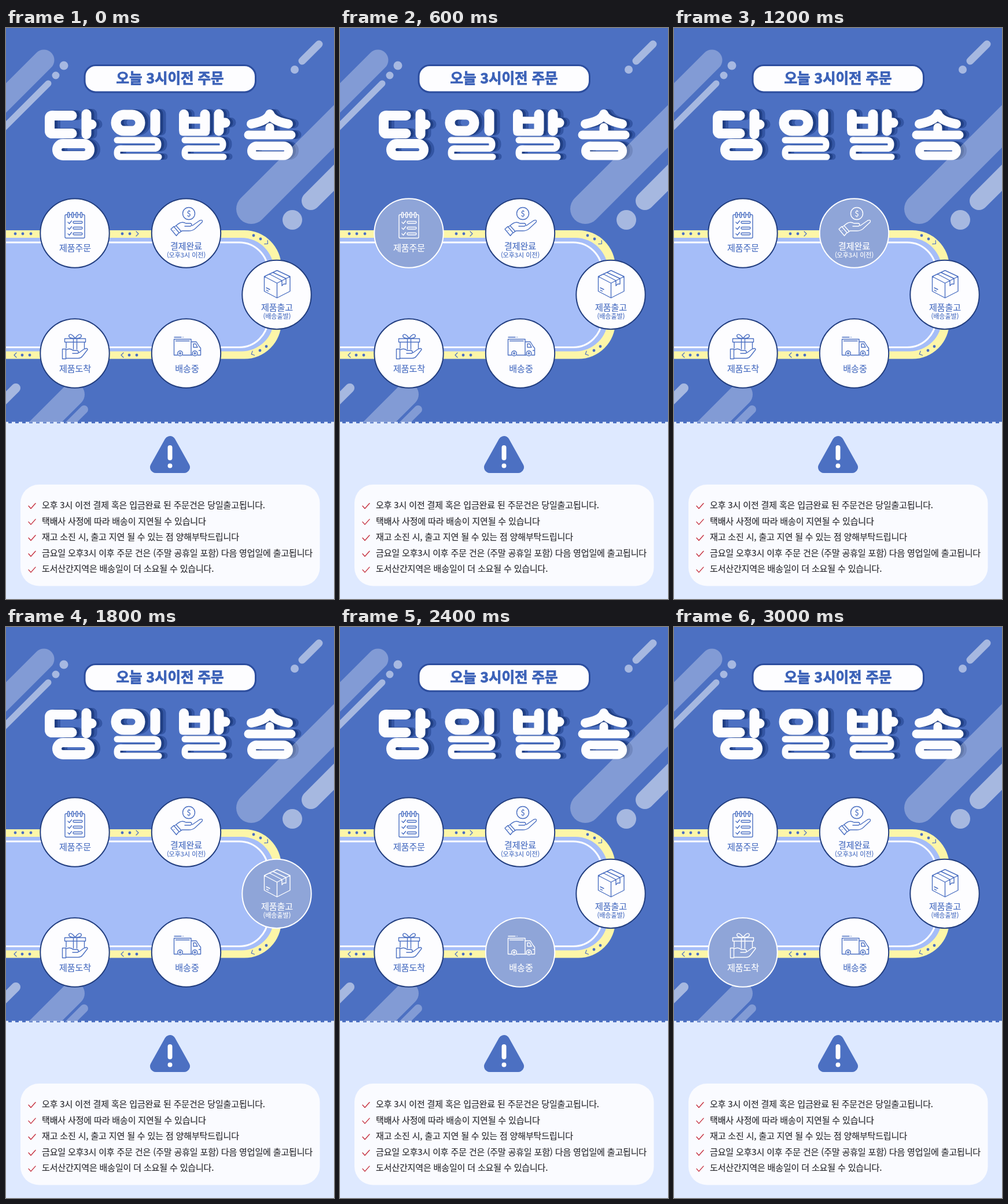
An HTML page that plays this animation: 567 by 988 pixels, repeating every 3.6 s.

```html
<!DOCTYPE html>
<html lang="ko">
<head>
<meta charset="utf-8">
<style>
html, body { margin: 0; width: 100%; height: 100%; overflow: hidden; background: #dee9ff; }
svg { display: block; width: 567px; height: 988px; font-family: "Noto Sans CJK KR", "Noto Sans KR", sans-serif; }
.line { fill: none; stroke-linecap: round; stroke-linejoin: round; }
.soft { stroke: #fff; stroke-opacity: .3; }
.bright { stroke: #fff; stroke-opacity: .5; }
.step { --ink: #4c70c2; --face: #fdfdff; --rim: #233f80; }
.step.on { --ink: #fff; --face: #8fa5d8; --rim: #fff; }
.step > circle { fill: var(--face); stroke: var(--rim); stroke-width: 2; }
.step text { fill: var(--ink); stroke: var(--ink); stroke-width: .2; text-anchor: middle; font-size: 15px; }
.step .sub { font-size: 11px; }
.icon { fill: none; stroke: var(--ink); stroke-width: 1.4; stroke-linecap: round; stroke-linejoin: round; }
.icon .cover { fill: var(--face); }
</style>
</head>
<body>
<svg viewBox="0 0 567 988">
  <defs>
    <clipPath id="sky"><path d="M0 0H567V683H0Z"/></clipPath>
    <g id="title" class="line" stroke-width="17">
      <path d="M114 151.500H80Q75.500 151.500 75.500 156V178Q75.500 182.500 80 182.500H114M139 149V184M139 167H148"/>
      <rect x="88" y="200" width="57" height="21" rx="10.500" stroke-width="16"/>
      <rect x="190" y="150" width="42" height="28" rx="14"/>
      <path d="M258 149V178"/>
      <path d="M192 194H256Q263 194 263 201.500T256 208.500H198Q192 208.500 192 216T198 223H264" stroke-width="11"/>
      <path d="M307.500 149.500V177M344 149.500V177"/>
      <path d="M308 159.500H343M305.500 180.500H346" stroke-width="12"/>
      <path d="M368 149V178M368 164H379"/>
      <path d="M309 194H368Q375 194 375 201.500T368 208.500H315Q309 208.500 309 216T315 223H376" stroke-width="11"/>
      <path d="M456 149Q451 161 424 166M456 149Q461 161 488 166" stroke-width="16"/>
      <path d="M456 172V184M419 185H493" stroke-width="15"/>
      <rect x="424.500" y="204" width="64" height="17" rx="8.500" stroke-width="15"/>
    </g>
  </defs>

  <path fill="#4c70c2" d="M0 0H567V684H0Z"/>
  <g class="line" clip-path="url(#sky)">
    <path class="soft" stroke-width="36" d="M65.500 55.500L-34 155"/>
    <path class="bright" stroke-width="11" d="M73 96L-20 189"/>
    <path class="bright" stroke-width="13" d="M512 57L541 28"/>
    <path class="bright" stroke-width="16" d="M17 623L-20 660"/>
    <path class="soft" stroke-width="40" d="M116 634L36 714"/>
    <path class="soft" stroke-width="14" d="M135 660L85 710"/>
  </g>
  <g fill="#fff" fill-opacity=".5">
    <circle cx="100" cy="65" r="7.500"/><circle cx="86" cy="82" r="6.500"/>
    <circle cx="499" cy="72" r="7"/><circle cx="495" cy="332" r="17"/>
  </g>

  <rect x="136" y="64.500" width="295.500" height="46.500" rx="19" fill="#fdfdff" stroke="#2c4d9e" stroke-width="3"/>
  <text x="283.500" y="96" text-anchor="middle" font-size="24.500" font-weight="900" fill="#3c62b8" stroke="#3c62b8" stroke-width=".9">오늘 3시이전 주문</text>

  <g role="img" aria-label="당일발송">
    <use href="#title" x="10" y="-.5" stroke="#3355a3"/>
    <use href="#title" x="5" y="-.5" stroke="#203f84"/>
    <use href="#title" stroke="#fdfdff"/>
  </g>
  <path class="line soft" stroke-width="52" d="M424 313L624 113"/>
  <path class="line bright" stroke-width="32" d="M527 299L627 199"/>

  <rect x="-100" y="350" width="576" height="222.500" rx="64" fill="#fdf6a8"/>
  <rect x="-100" y="363" width="563" height="196.500" rx="56" fill="#a5bdf8"/>
  <rect x="-100" y="371" width="553" height="181.500" rx="50" fill="none" stroke="#fdfdff" stroke-width="3"/>
  <g id="marks" fill="#4c70c2"></g>

  <g class="step">
    <circle cx="119" cy="355" r="59.700"/>
    <g class="icon">
      <rect x="102" y="323" width="34" height="40.500" rx="2"/>
      <path d="M107 336l2.500 2.500 4-5M107 346l2.500 2.500 4-5M107 356l2.500 2.500 4-5"/>
      <g class="cover">
        <rect x="106.500" y="319" width="3" height="9" rx="1.500"/><rect x="113.700" y="319" width="3" height="9" rx="1.500"/>
        <rect x="121" y="319" width="3" height="9" rx="1.500"/><rect x="128.500" y="319" width="3" height="9" rx="1.500"/>
        <rect x="116" y="334.500" width="16" height="3.500" rx="1.700"/><rect x="116" y="344.500" width="16" height="3.500" rx="1.700"/>
        <rect x="116" y="354.500" width="16" height="3.500" rx="1.700"/>
      </g>
    </g>
    <text x="119.500" y="385.500">제품주문</text>
  </g>

  <g class="step">
    <circle cx="311.500" cy="355" r="59.700"/>
    <g class="icon">
      <circle cx="316" cy="321" r="10.500"/>
      <path d="M285 348l5-4.500 9 10.500-4.500 5.500ZM291 344l3-2 9 10-3.500 2.500M294 342Q303 333 311 338H319Q323 340 319 343H309M322 342L335 333Q341 331 339 336L326 348Q322 351 316 351H305L302 352"/>
      <path d="M290.500 350.500v.1"/>
    </g>
    <text x="316" y="326" style="font-size:13px">$</text>
    <text x="311.500" y="382.500">결제완료</text>
    <text class="sub" x="311.500" y="397">(오후3시 이전)</text>
  </g>

  <g class="step">
    <circle cx="468" cy="461.500" r="59.700"/>
    <g class="icon">
      <path d="M468.500 419.500L491 430V455.500L468.500 467 446.500 455.500V430ZM446.500 430L468.500 441.500 491 430M468.500 441.500V467M455 425.500L477 437V446L480 443 484 443V433.500L461.500 423M450 449.500l6 3M450 453.500l3.500 1.800"/>
    </g>
    <text x="468.500" y="488.500">제품출고</text>
    <text class="sub" x="468.500" y="503">(배송출발)</text>
  </g>

  <g class="step">
    <circle cx="311.500" cy="563" r="59.700"/>
    <g class="icon">
      <path d="M296.500 566H290.500V538.500H320V566H305.500M291 535H303M306 535h.1M293.500 541.500H317M320 543H329L334 551 336.500 554V566H331M320 566H322M324 546.500H328L331 552.500H324ZM336 558H333.500"/>
      <circle cx="301" cy="563" r="4.300"/><circle cx="301" cy="563" r="1.300"/>
      <circle cx="326.500" cy="563" r="4.300"/><circle cx="326.500" cy="563" r="1.300"/>
    </g>
    <text x="313" y="595">배송중</text>
  </g>

  <g class="step">
    <circle cx="119" cy="563" r="59.700"/>
    <g class="icon">
      <path d="M101.500 537.500H137.500V543.500H101.500ZM104 543.500V554M135.500 543.500V554M116.500 537.500V556M122.500 537.500V556M119.500 537Q107 537 109 531.500 112 527 119.500 537 127 527 130 531.500 132 537 119.500 537"/>
      <path d="M97.500 555.500H103.500V572.500H97.500ZM103.500 557Q111 553 116 558H123Q127 559.500 124 563H115M126 562L135 555.500Q141 553 141 556.500L132 568Q129 571.500 125 571.500H103.500"/>
    </g>
    <text x="119.500" y="595">제품도착</text>
  </g>

  <path fill="#dee9ff" d="M0 684H567V988H0Z"/>
  <path d="M-2 683H567" stroke="#e8f0ff" stroke-width="3" stroke-dasharray="6 6"/>
  <path d="M283.500 716L308 760H259Z" fill="#4c70c2" stroke="#4c70c2" stroke-width="20" stroke-linejoin="round"/>
  <path class="line" d="M283.500 726V744M283.500 757.500v.1" stroke="#fdfdff" stroke-width="8"/>
  <rect x="25" y="790" width="517.500" height="175.500" rx="32" fill="#fafbff"/>
  <g id="notes" fill="#2e2e33" font-size="15" letter-spacing="-.15"></g>
</svg>
<script>
const notes = [
  '오후 3시 이전 결제 혹은 입금완료 된 주문건은 당일출고됩니다.',
  '택배사 사정에 따라 배송이 지연될 수 있습니다',
  '재고 소진 시, 출고 지연 될 수 있는 점 양해부탁드립니다',
  '금요일 오후3시 이후 주문 건은 (주말 공휴일 포함) 다음 영업일에 출고됩니다',
  '도서산간지역은 배송일이 더 소요될 수 있습니다.'
];
document.getElementById('notes').innerHTML = notes.map((note, i) => {
  const y = 826 + i * 27.6;
  return `<path class="line" d="M39 ${y + 1}l4 4.500 8-9" stroke="#c5303f" stroke-width="1.400"/>
    <text x="62" y="${y + 5}" stroke="#2e2e33" stroke-width=".2">${note}</text>`;
}).join('');

const dots = [[16, 356], [29, 356], [43, 356], [201, 356], [214, 356], [428, 359], [440, 365],
  [450, 551], [439, 558], [213, 566], [226, 566], [28, 566], [41, 566]];
const arrows = [[227, 356, 0], [451, 372, 42], [426, 563.5, 155], [201, 566, 180], [16, 566, 180]];
document.getElementById('marks').innerHTML =
  dots.map(([x, y]) => `<circle cx="${x}" cy="${y}" r="2.400"/>`).join('') +
  arrows.map(([x, y, angle]) => `<path class="line" stroke="#4c70c2" stroke-width="1.200"
    d="M-2-4L2 0-2 4" transform="translate(${x} ${y}) rotate(${angle})"/>`).join('');

const steps = document.querySelectorAll('.step');
function draw() {
  const active = Math.floor(performance.now() % 3600 / 600) - 1;
  steps.forEach((step, i) => step.classList.toggle('on', i === active));
  requestAnimationFrame(draw);
}
draw();
</script>
</body>
</html>
```
